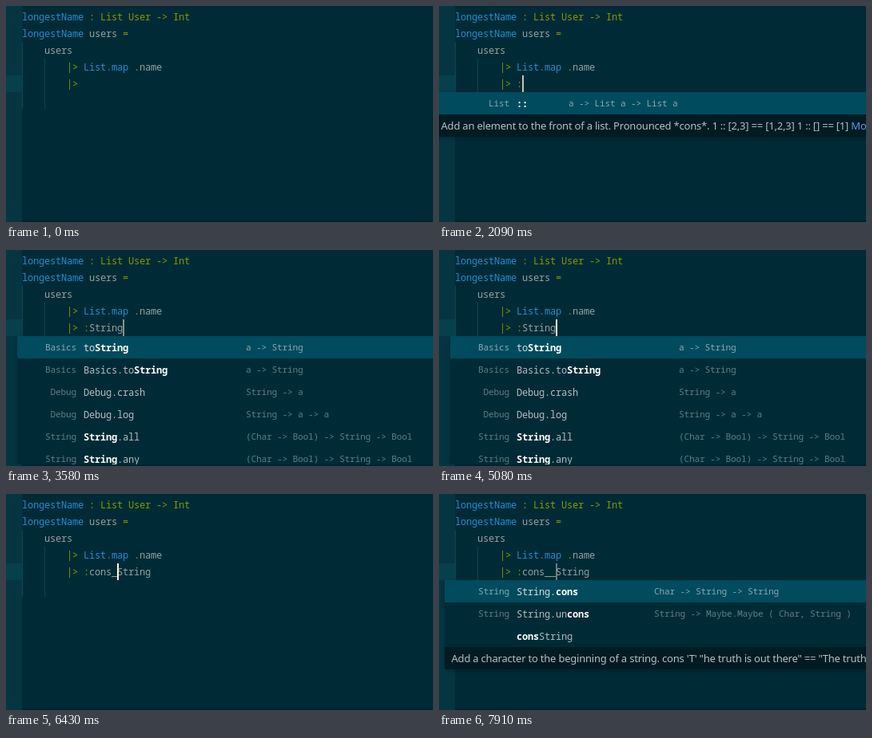
An HTML page for the animation above (8 s loop, 534 px wide and 271 px high).

```html
<!DOCTYPE html>
<html lang="en">
<head>
<meta charset="utf-8">
<title>Autocomplete</title>
<style>
  html, body { margin: 0; width: 100%; height: 100%; overflow: hidden; background: #002b36; }
  svg { display: block; width: 100vw; height: 100vh; }
  text { white-space: pre; }
  .code { font: 12px "Noto Sans Mono", "DejaVu Sans Mono", monospace; letter-spacing: -0.2px; }
  .small { font: 11.1px "Noto Sans Mono", "DejaVu Sans Mono", monospace; letter-spacing: -0.16px; }
  .doc { font: 13px "Noto Sans", "Open Sans", sans-serif; letter-spacing: -0.21px; fill: #b2c0c2; }
  .match { font-weight: 700; fill: #fff; }
  .panel { filter: drop-shadow(0 2px 2px rgba(0, 0, 0, .2)); }
</style>
</head>
<body>
<svg viewBox="0 0 534 271">
  <rect width="534" height="271" fill="#002b36"/>
  <rect width="20" height="271" fill="#053541"/>
  <rect y="87" width="20" height="21" fill="#07404d"/>
  <path d="M20.5 45V129M48.5 66V129" stroke="#0a4552"/>
  <g id="code"></g>
  <g id="typed"></g>
  <rect id="cursor" y="87" width="2" height="21" fill="#fdf6e3"/>
  <g id="popup"></g>
  <rect y="269" width="20" height="2" fill="#053541"/>
  <rect x="20" y="269" width="514" height="2" fill="#00232c"/>
</svg>
<script>
const LOOP = 8000, CHAR = 7, FADE = 250;
const BLUE = '#268bd2', GREEN = '#859900', GREY = '#93a1a1', RED = '#dc322f';
const $ = id => document.getElementById(id);
const esc = s => s.replace(/&/g, '&amp;').replace(/</g, '&lt;').replace(/>/g, '&gt;');

const span = ([s, color]) => `<tspan fill="${color}">${esc(s)}</tspan>`;
const line = (col, row, ...parts) =>
  `<text class="code" x="${20 + col * CHAR}" y="${18 + row * 21}">${parts.map(span).join('')}</text>`;

$('code').innerHTML =
  line(0, 0, ['longestName', BLUE], [' : List User -> Int', GREEN]) +
  line(0, 1, ['longestName', BLUE], [' users ', GREY], ['=', GREEN]) +
  line(4, 2, ['users', GREY]) +
  line(8, 3, ['|> ', GREEN], ['List.map', BLUE], [' .', GREEN], ['name', GREY]);

// Rows hold module, word and signature.
const basics = [
  ['Basics', 'toString', 'a -> String'],
  ['Basics', 'Basics.toString', 'a -> String'],
  ['Debug', 'Debug.crash', 'String -> a'],
  ['Debug', 'Debug.log', 'String -> a -> a']
];
const fold = '(Char -> Bool) -> String -> Bool';
const popups = {
  cons: {
    x: -6, sig: 162, rows: [['List', '::', 'a -> List a -> List a']],
    doc: 'Add an element to the front of a list. Pronounced *cons*. 1 :: [2,3] == [1,2,3] 1 :: [] == [1] ',
    link: 'More'
  },
  sub: {
    x: 1, sig: 284,
    rows: [...basics, ['Platform.Sub', 'Sub', 'Sub'], ['Platform.Sub', 'Sub.Sub', 'Sub']]
  },
  string: {
    x: 14, sig: 300,
    rows: [...basics, ['String', 'String.all', fold], ['String', 'String.any', fold]]
  },
  strCons: {
    x: 7, sig: 269,
    rows: [
      ['String', 'String.cons', 'Char -> String -> String'],
      ['String', 'String.uncons', 'String -> Maybe.Maybe ( Char, String )'],
      ['', 'consString', '']
    ],
    doc: 'Add a character to the beginning of a string. cons \'T\' "he truth is out there" == "The truth is out there"'
  }
};

function mark(word, query) {
  let i = word.indexOf(query);
  if (i < 0) i = word.indexOf(query.toLowerCase());
  if (i < 0) return esc(word);
  const end = i + query.length;
  return esc(word.slice(0, i)) + `<tspan class="match">${esc(word.slice(i, end))}</tspan>` + esc(word.slice(end));
}

function popupMarkup({ x, sig, rows, doc, link = '' }, query) {
  const h = rows.length * 28;
  const box = (height, fill, extra = '') =>
    `<rect x="${x}" y="108" width="560" height="${height}" fill="${fill}" ${extra}/>`;
  let out = box(h + (doc ? 28 : 0), doc ? '#011b22' : '#002b36', 'rx="3" class="panel"') +
    box(h, '#002b36') + box(28, '#004b5d', 'rx="1"');
  rows.forEach(([mod, word, type], i) => {
    const y = 126 + i * 28, dim = i ? '#5d7d84' : '#86a8b0';
    out += `<text class="small" x="88" y="${y}" text-anchor="end" fill="${dim}">${mod}</text>` +
      `<text class="code" x="97" y="${y + 1}" fill="${i ? '#b0bec0' : '#d5dfe0'}">${mark(word, query)}</text>` +
      `<text class="small" x="${sig}" y="${y}" fill="${dim}">${esc(type)}</text>`;
  });
  if (doc) out += `<text class="doc" x="${x + 8.5}" y="${h + 127}">${esc(doc)}<tspan fill="#5f96ee">${link}</tspan></text>`;
  return out;
}

// Time, text before the cursor, text after it, popup, matched query.
const steps = [
  [0, '', ''],
  [750, ':', ''],
  [900, ':', '', 'cons', '::'],
  [2540, ':S', '', 'sub', 'S'],
  [2690, ':St', '', 'string', 'St'],
  [2840, ':Stri', '', 'string', 'Stri'],
  [2990, ':Strin', '', 'string', 'Strin'],
  [3130, ':String', '', 'string', 'String'],
  [5380, ':', 'String'],
  [5830, ':c', 'String'],
  [5980, ':co', 'String'],
  [6130, ':cons', 'String'],
  [6430, ':cons_', 'String'],
  [6580, ':cons__', 'String', 'strCons', 'cons']
];

// Cursor turns on and off in alternation, starting hidden.
const blinks = [140, 590, 750, 1130, 1580, 2030, 2380, 3460, 3910, 4360, 4810, 5260, 5380, 6880, 7320, 7760];

function cursorAlpha(t) {
  let alpha = 0, dir = -1, last = 0;
  for (const b of [...blinks, Infinity]) {
    const now = Math.min(b, t);
    alpha = Math.max(0, Math.min(1, alpha + dir * (now - last) / FADE));
    if (b >= t) return alpha;
    last = b;
    dir = -dir;
  }
}

let shown;
function draw(t) {
  const step = steps.findLast(s => s[0] <= t);
  if (step !== shown) {
    const [, before, after, popup, query] = shown = step;
    const text = (before + after).slice(1);
    $('typed').innerHTML = line(8, 4, ['|> ' + before.slice(0, 1), GREEN], [text, text === 'S' ? RED : GREY]);
    $('popup').innerHTML = popup ? popupMarkup(popups[popup], query) : '';
    $('cursor').setAttribute('x', 97 + before.length * CHAR);
  }
  $('cursor').setAttribute('opacity', cursorAlpha(t).toFixed(3));
}

const start = performance.now();
function tick() {
  draw((performance.now() - start) % LOOP);
  requestAnimationFrame(tick);
}
tick();
</script>
</body>
</html>
```
